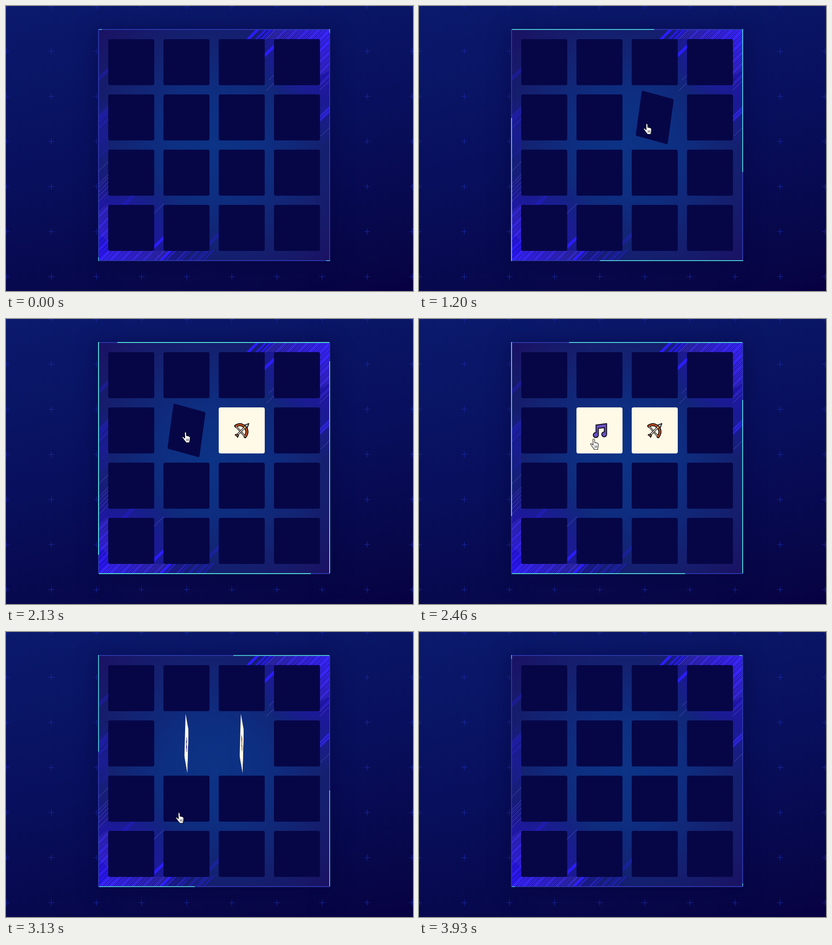
An HTML page without scripts that plays this animation: 884 px wide and 619 px high, repeating every 4000 ms.

```html
<!DOCTYPE html>
<html lang="en">
<head>
<meta charset="utf-8">
<title>Memory board</title>
<style>
  :root { --loop: 4s; --lead: -7ms; }
  html, body { margin: 0; width: 100%; height: 100%; overflow: hidden; }
  body {
    position: relative;
    background: linear-gradient(168deg, #0b1a6d 0%, #08105e 45%, #070546 92%, #070042 100%);
  }
  .layer { position: absolute; left: 0; top: 0; width: 884px; height: 619px; }

  .board {
    position: absolute; left: 200px; top: 50px;
    width: 504px; height: 504px; box-sizing: border-box;
    background: radial-gradient(circle at 50% 50%, #0c3385 0%, #0d2f82 28%, #14206f 68%, #1b1163 100%);
    box-shadow: 0 6px 40px 6px rgba(6, 3, 58, .4);
  }

  /* Running light: one bar per side, sliding through its own clipped track */
  .side {
    position: absolute; left: 200px; top: 50px;
    width: 504px; height: 504px; overflow: hidden;
    box-sizing: border-box; border-top: 0;
    transform: rotate(calc(var(--n) * 90deg));
    pointer-events: none;
  }
  .side::before, .side::after {
    content: ""; position: absolute; left: 0; top: 0;
    width: 100%; height: 2px; background: #2b37a8;
  }
  .side::after {
    background: #50e3dc;
    animation: run var(--loop) steps(60) var(--lead) infinite,
               glow var(--loop) linear var(--lead) infinite;
  }
  @keyframes run {
    from { transform: translateX(-98.333%); }
    to { transform: translateX(101.667%); }
  }
  @keyframes glow {
    0%, 100% { opacity: .62; }
    50% { opacity: 1; }
  }

  .grid {
    position: absolute; left: 222px; top: 72px;
    display: grid; grid-template-columns: repeat(4, 100px);
    grid-auto-rows: 100px; gap: 20px;
  }
  .card { border-radius: 4px; background: #060647; position: relative; }
  .face {
    position: absolute; inset: 0; border-radius: 4px;
    background: #fff9e8; opacity: 0;
  }
  .face svg { position: absolute; left: 34px; top: 34px; overflow: visible; }

  .first { animation: flip-first var(--loop) var(--lead) infinite, shake var(--loop) step-end var(--lead) infinite; }
  .second { animation: flip-second var(--loop) var(--lead) infinite, shake var(--loop) step-end var(--lead) infinite; }
  .first .face { animation: show-first var(--loop) step-end var(--lead) infinite; }
  .second .face { animation: show-second var(--loop) step-end var(--lead) infinite; }

  @keyframes flip-first {
    0% { transform: rotateY(0deg) rotate(0deg); animation-timing-function: step-end; }
    28.333% { transform: rotateY(15deg) rotate(4deg); animation-timing-function: steps(3, jump-none); }
    33.333% { transform: rotateY(75deg) rotate(18deg); animation-timing-function: steps(3, jump-none); }
    38.333% { transform: rotateY(15deg) rotate(4deg); animation-timing-function: step-start; }
    70% { transform: rotateY(0deg) rotate(0deg); animation-timing-function: step-end; }
    75% { transform: rotateY(4deg) rotate(1deg); animation-timing-function: steps(3, jump-none); }
    80% { transform: rotateY(86deg) rotate(21deg); animation-timing-function: steps(3, jump-none); }
    85% { transform: rotateY(26.5deg) rotate(6.4deg); animation-timing-function: step-start; }
    100% { transform: rotateY(0deg) rotate(0deg); }
  }
  @keyframes flip-second {
    0% { transform: rotateY(0deg) rotate(0deg); animation-timing-function: step-end; }
    51.667% { transform: rotateY(15deg) rotate(4deg); animation-timing-function: steps(3, jump-none); }
    56.667% { transform: rotateY(75deg) rotate(18deg); animation-timing-function: steps(3, jump-none); }
    61.667% { transform: rotateY(15deg) rotate(4deg); animation-timing-function: step-start; }
    70% { transform: rotateY(0deg) rotate(0deg); animation-timing-function: step-end; }
    75% { transform: rotateY(4deg) rotate(1deg); animation-timing-function: steps(3, jump-none); }
    80% { transform: rotateY(86deg) rotate(21deg); animation-timing-function: steps(3, jump-none); }
    85% { transform: rotateY(26.5deg) rotate(6.4deg); animation-timing-function: step-start; }
    100% { transform: rotateY(0deg) rotate(0deg); }
  }
  @keyframes show-first { 0%, 80%, 100% { opacity: 0; } 33.333% { opacity: 1; } }
  @keyframes show-second { 0%, 80%, 100% { opacity: 0; } 56.667% { opacity: 1; } }
  @keyframes shake {
    0%, 73.333%, 100% { translate: 0; }
    66.667%, 70% { translate: -3px; }
    68.333%, 71.667% { translate: 3px; }
  }

  .hand {
    position: absolute; left: 0; top: 0; width: 1px; height: 1px; overflow: visible;
    animation: point var(--loop) var(--lead) infinite;
  }
  @keyframes point {
    0%, 15% { transform: translate(910px, 640px); animation-timing-function: step-end; }
    16.667% { transform: translate(841px, 564px); animation-timing-function: steps(3); }
    21.667% { transform: translate(503px, 280px); animation-timing-function: steps(3); }
    26.667% { transform: translate(497px, 258px); animation-timing-function: steps(2); }
    30% { transform: translate(495px, 256px); animation-timing-function: steps(4); }
    36.667% { transform: translate(407px, 231px); animation-timing-function: steps(4); }
    43.333% { transform: translate(386px, 235px); animation-timing-function: steps(6); }
    53.333% { transform: translate(390px, 246px); animation-timing-function: steps(4); }
    60% { transform: translate(384px, 253px); animation-timing-function: steps(5); }
    68.333% { transform: translate(362px, 292px); animation-timing-function: steps(9); }
    83.333% { transform: translate(383px, 443px); animation-timing-function: steps(4); }
    90%, 100% { transform: translate(410px, 640px); animation-timing-function: step-end; }
  }
</style>
</head>
<body>

<svg class="layer" viewBox="0 0 884 619">
  <defs>
    <pattern id="cross" x="-49" y="-49" width="98" height="97.9" patternUnits="userSpaceOnUse">
      <path d="M43 49.5h13M49.5 43v13" stroke="#1a28a4" fill="none"/>
    </pattern>
  </defs>
  <rect width="884" height="619" fill="url(#cross)"/>
</svg>

<div class="board"></div>

<!-- Glowing corners with diagonal streaks and dots -->
<svg class="layer" viewBox="0 0 884 619">
  <defs>
    <clipPath id="inside"><rect x="202" y="52" width="500" height="500"/></clipPath>
    <radialGradient id="top" gradientUnits="userSpaceOnUse" cx="700" cy="62" r="175">
      <stop offset="0" stop-color="#2a16f4"/>
      <stop offset=".35" stop-color="#2614d8" stop-opacity=".85"/>
      <stop offset=".75" stop-color="#2016b0" stop-opacity=".5"/>
      <stop offset="1" stop-color="#1c14a0" stop-opacity="0"/>
    </radialGradient>
    <radialGradient id="low" gradientUnits="userSpaceOnUse" cx="206" cy="545" r="205">
      <stop offset="0" stop-color="#2a16fa"/>
      <stop offset=".35" stop-color="#2414d0" stop-opacity=".85"/>
      <stop offset=".7" stop-color="#2016ac" stop-opacity=".5"/>
      <stop offset="1" stop-color="#1c14a0" stop-opacity="0"/>
    </radialGradient>
    <linearGradient id="edge" x1="0" y1="0" x2="0" y2="1">
      <stop offset="0" stop-color="#2018b0" stop-opacity="0"/>
      <stop offset=".5" stop-color="#2018b4" stop-opacity=".5"/>
      <stop offset="1" stop-color="#2018b0" stop-opacity="0"/>
    </linearGradient>
    <pattern id="dots" width="4" height="4" patternUnits="userSpaceOnUse">
      <path d="M0 0h1v1h-1zM2 2h1v1h-1z" fill="#9a86ff"/>
    </pattern>
    <pattern id="hatch" width="17" height="17" patternUnits="userSpaceOnUse" patternTransform="rotate(45)">
      <path d="M2 0v17M12 0v17" stroke="#180d84" stroke-width="2"/>
      <path d="M7 0v17" stroke="#3826ff" stroke-width="3"/>
    </pattern>
  </defs>
  <g clip-path="url(#inside)" fill="none">
    <path d="M545 52H702V240H525z" fill="url(#top)"/>
    <path d="M202 340H420V552H202z" fill="url(#low)"/>
    <path d="M682 140h20v150l-20 20z" fill="url(#edge)"/>
    <path d="M202 195h20v170h-20z" fill="url(#edge)"/>

    <g fill="url(#hatch)">
      <path d="M542 72l20-20H702V150l-20 20V72z" opacity=".5"/>
      <path d="M202 450l20-20V532H400l-20 20H202z" opacity=".5"/>
      <path d="M202 235l20-20v45l-20 20zM380 552l20-20h60l-20 20z" opacity=".25"/>
    </g>

    <g stroke="#2c1cff">
      <path d="M522 76l26-26M558 111l26-25M320 525l24-23M335 554l24-24" stroke-width="6"/>
      <path d="M540 76l26-26M551 76l26-26M680 100l26-26" stroke-width="4" opacity=".8"/>
      <path d="M680 247l26-26" stroke-width="11" opacity=".5"/>
      <path d="M200 160l24-24M200 252l24-24M252 436l26-26M410 556l30-30M438 520l30-30" stroke-width="8" opacity=".25"/>
      <path d="M200 240l24-24M200 247l24-24M200 262l24-24M200 270l24-24M200 435l24-24M200 330l24-24" opacity=".5"/>
      <path d="M376 556l26-26M396 556l26-26M425 556l26-26" stroke-width="3" opacity=".4"/>
    </g>

    <g fill="url(#dots)">
      <path d="M562 72l20-20H702V140l-20 12V72z" opacity=".8"/>
      <path d="M202 446l20-18V510l-20-14zM224 532H356l-20 20H204z" opacity=".75"/>
    </g>
    <g stroke="#9a82ff" stroke-dasharray="1.2 2.2" stroke-width="1.2">
      <path d="M566 183l17-17M572 160l10-10M682 172l21-20M682 182l21-20M682 240l21-20M682 248l21-20M684 282l19-18" opacity=".75"/>
      <path d="M202 358l20-20M202 386l20-20M202 393l20-20M202 403l20-20M202 412l20-20M202 424l20-20M322 450l20-20" opacity=".75"/>
    </g>
  </g>
</svg>

<div class="side" style="--n:0"></div>
<div class="side" style="--n:1"></div>
<div class="side" style="--n:2"></div>
<div class="side" style="--n:3"></div>

<div class="grid">
  <div class="card"></div><div class="card"></div><div class="card"></div><div class="card"></div>
  <div class="card"></div>
  <div class="card second">
    <div class="face">
      <svg width="32" height="32" viewBox="0 0 32 32">
        <path d="M8.5 4.3L31.5 1.3V23.8A5.3 5.3 0 1 1 26.5 19.3V10L13.5 11.6V25.6A5.5 5.5 0 1 1 8.5 20.6z"
          fill="#6b50c4" stroke="#0d0b14" stroke-width="2" stroke-linejoin="round"/>
      </svg>
    </div>
  </div>
  <div class="card first">
    <div class="face">
      <svg width="32" height="32" viewBox="0 0 32 32" fill="none" stroke="#0f0c0c" stroke-linejoin="round">
        <path d="M3 6.5Q13 0 21.500 7.500Q32 17 23.500 29.500" stroke-width="6.500" stroke-linecap="round"/>
        <path d="M3 6.500L23 29" stroke-width="4"/>
        <path d="M3 6.500L23 29" stroke="#f3ead8" stroke-width="1.300"/>
        <path d="M3 6.500Q13 0 21.500 7.500Q32 17 23.500 29.500" stroke="#c8511f" stroke-width="3" stroke-linecap="round"/>
        <path d="M4 28L27 5" stroke-width="4.500"/>
        <path d="M4 28L27 5" stroke="#e9e2dc" stroke-width="1.800"/>
        <path d="M31.500 1L22 4.500L28 10.500z" fill="#c3c6d0" stroke-width="1.800"/>
        <path d="M1.500 25.500L6 24L9 27L7 31L5.500 28.500z" fill="#d98a4a" stroke-width="1.800"/>
        <circle cx="23" cy="9" r="1.800" fill="#f6b52c" stroke="none"/>
      </svg>
    </div>
  </div>
  <div class="card"></div>
  <div class="card"></div><div class="card"></div><div class="card"></div><div class="card"></div>
  <div class="card"></div><div class="card"></div><div class="card"></div><div class="card"></div>
</div>

<svg class="hand" viewBox="0 0 1 1">
  <path d="M-2 1.500Q-2-.3-.3-.3Q1.400-.3 1.500 1.500L2 8Q3.700 6.700 5 8.400Q6.700 7.400 7.700 9.200Q9.700 9 9.800 11.200V16Q9.600 18.500 8.600 20V22.500H.5V21Q-2 19-4 15.500L-7 11.500Q-7.300 9.300-5 9.800L-1.400 13z"
    fill="#fff" stroke="#0a0a14" stroke-width="1.100" stroke-linejoin="round"/>
  <path d="M2.300 14v5M4.600 14v5M6.900 14v5" stroke="#0a0a14" stroke-width=".8"/>
</svg>

</body>
</html>
```
